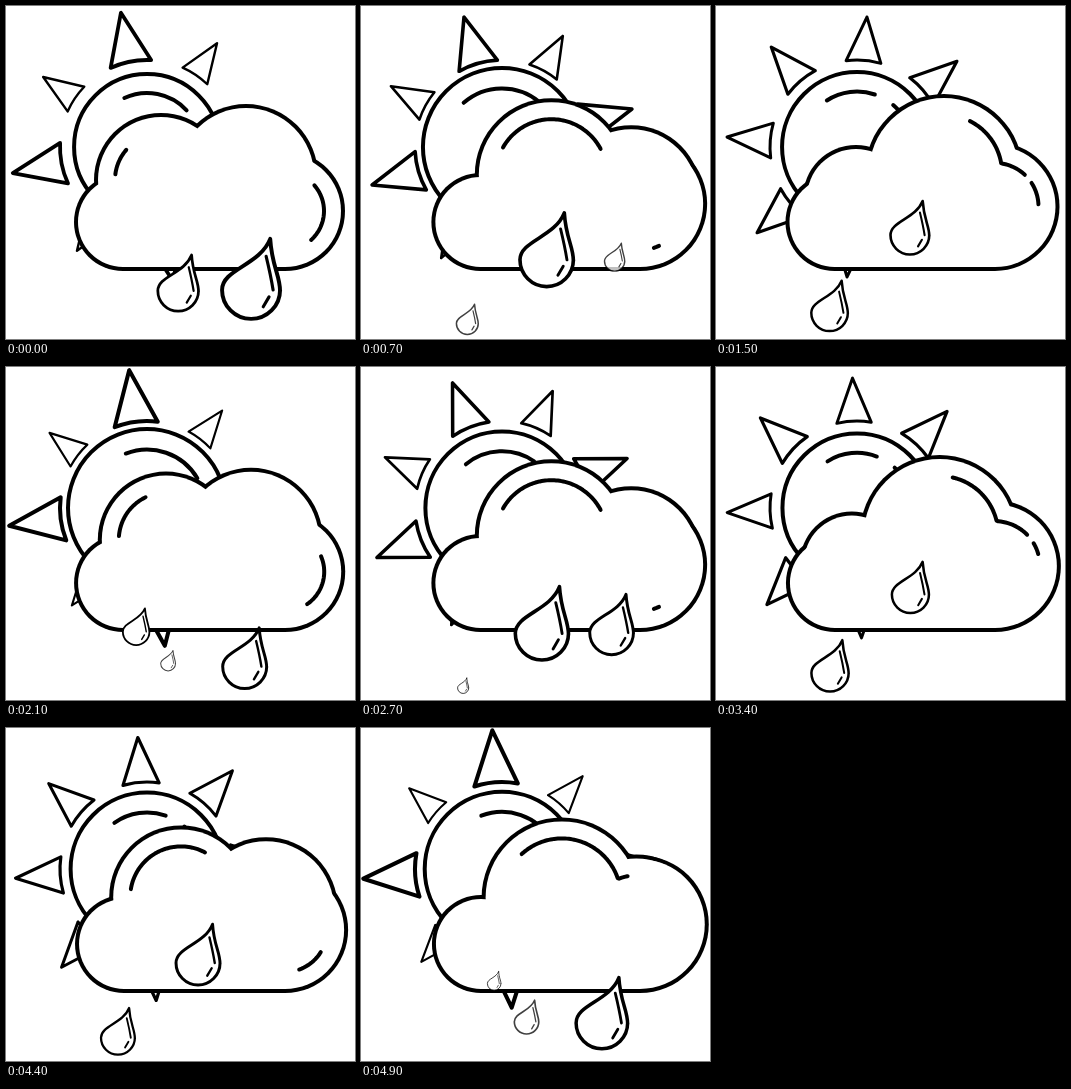
An HTML page with a canvas that plays this animation: 349 px wide and 333 px high, repeating every 5000 ms.

```html
<!DOCTYPE html>
<html lang="en">
<head>
<meta charset="utf-8">
<title>Sun, cloud and rain</title>
<style>
html, body { margin: 0; width: 100%; height: 100%; overflow: hidden; background: #fff; }
canvas { display: block; }
</style>
</head>
<body>
<canvas id="stage" width="349" height="333"></canvas>
<script>
const ctx = document.getElementById('stage').getContext('2d');
const LOOP = 5000, STEP = 100, ROLL = 2000, BEAT = 955;
const TURN = 2 * Math.PI, RAD = Math.PI / 180;
const SUN = { x: 141, y: 141 };
const PIVOT = { x: 205, y: 215 };
const GROUND = 263;
const INK = '#000', PAPER = '#fff';

// path of a cloud bump, one point per quarter roll: x, y, radius
const BUMP = [[119, 214, 45], [140, 192, 51], [155, 174, 65], [180, 168, 71], [206, 170, 80],
  [228, 167, 77], [240, 170, 70], [265, 184, 70], [278, 198, 66]];

const DROPS = [
  { born: .43, span: .87, x: 201, drift: -44, y: 206, fall: 92, size: 54 },
  { born: .69, span: .78, x: 255, drift: -25, y: 250, fall: 58, size: 58 },
  { born: 1.09, span: .83, x: 135, drift: -37, y: 250, fall: 72, size: 42 }
];

const polar = (r, deg) => [r * Math.cos(deg * RAD), r * Math.sin(deg * RAD)];

function pen(width) {
  ctx.lineWidth = width;
  ctx.lineCap = ctx.lineJoin = 'round';
  ctx.strokeStyle = INK;
  ctx.fillStyle = PAPER;
}

function arc(r, from, to) {
  ctx.beginPath();
  ctx.arc(0, 0, r, from * RAD, to * RAD);
  ctx.stroke();
}

function drawRay(angle, contrast) {
  const half = (35.5 + contrast * .5) / 2;
  const spread = Math.asin(half / 87) / RAD;
  ctx.beginPath();
  ctx.moveTo(...polar(131 + contrast / 2, angle));
  ctx.lineTo(...polar(87, angle - spread));
  ctx.arc(0, 0, 87, (angle - spread) * RAD, (angle + spread) * RAD);
  ctx.closePath();
  pen(3.1 + contrast * .06);
  ctx.stroke();
}

function drawSun(time) {
  // a steady turn that lags behind at first
  const lag = 15.5 * Math.sin(Math.PI * (time / 3400) ** .75);
  const spin = -101 - time * .09 + Math.max(-2, lag);
  const x = (time / BEAT + .92) % 1;
  const contrast = 3.5 + 12.5 * Math.cos(TURN * x ** 1.8);
  const radius = 75.9 + 3.2 * Math.cos(2 * TURN * (x - .64));
  const from = -124 + contrast * .8, to = -75 + Math.abs(contrast) * 2.8;
  ctx.save();
  ctx.translate(SUN.x, SUN.y);
  for (let i = 0; i < 8; i++) drawRay(spin + i * 45, i % 2 ? -contrast : contrast);
  pen(4);
  arc(radius, 0, 360);
  arc(radius * .74, from, to);
  arc(radius * .74, to + 22, to + 30);
  ctx.restore();
}

function bumpAt(u) {
  const pos = (u - .5) * 4, i = Math.floor(pos);
  if (i < 0 || i >= BUMP.length - 1) return null;
  const [x, y, r] = BUMP[i].map((v, j) => v + (BUMP[i + 1][j] - v) * (pos - i));
  return { x, y, r };
}

// two swaying end puffs with bumps rolling from the left one to the right one
function cloudCircles(phase) {
  const sway = Math.cos(TURN * phase);
  const r = 62.5 - 4.5 * sway;
  const left = { x: 118.5 - 1.5 * sway, y: GROUND - 47, r: 47 };
  const right = { x: 279, y: GROUND - r, r };
  const bumps = [phase, phase + 1, phase + 2].map(bumpAt).filter(Boolean);
  return [left, ...bumps, right];
}

function fillCloud(circles, grow, color) {
  const left = circles[0], right = circles[circles.length - 1];
  ctx.fillStyle = color;
  for (const c of circles) {
    ctx.beginPath();
    ctx.arc(c.x, c.y, c.r + grow, 0, TURN);
    ctx.fill();
  }
  ctx.fillRect(left.x, 205, right.x - left.x, GROUND - 205 + grow);
}

// farthest edge of the inset circles, seen from the pivot
function reach(circles, deg) {
  const [ux, uy] = polar(1, deg);
  let far = 0;
  for (const c of circles) {
    const x = c.x - PIVOT.x, y = c.y - PIVOT.y, r = c.r - 19;
    const along = x * ux + y * uy, off = x * uy - y * ux;
    if (Math.abs(off) < r) far = Math.max(far, along + Math.sqrt(r * r - off * off));
  }
  return [PIVOT.x + far * ux, PIVOT.y + far * uy];
}

function drawShine(circles, from, to) {
  if (to <= from) return;
  ctx.beginPath();
  for (let a = from; a < to; a++) ctx.lineTo(...reach(circles, a));
  ctx.lineTo(...reach(circles, to));
  ctx.stroke();
}

function drawCloud(time) {
  const phase = time / ROLL % 1;
  const circles = cloudCircles(phase);
  fillCloud(circles, 2, INK);
  fillCloud(circles, -2, PAPER);
  pen(4);
  for (const u of [phase - 1, phase, phase + 1]) {
    if (u < -.07 || u > 1.45) continue;
    const head = 17 - 157 * Math.max(0, 1 - u / 1.25) ** 2;
    const tail = 17 - 85.5 * (1 + Math.cos(Math.PI * u / 1.45));
    drawShine(circles, tail, Math.min(head, -24));
    drawShine(circles, Math.max(tail, -19), head);
  }
}

function drawDrop(cx, cy, w) {
  if (w < 3) return;
  const line = Math.max(1, w * .068) / w;
  ctx.save();
  ctx.translate(cx, cy);
  ctx.scale(w, w);
  pen(line);
  if (w < 26) ctx.globalAlpha = .75;
  ctx.beginPath();
  ctx.moveTo(.33, -.88);
  ctx.bezierCurveTo(.36, -.4, .5, -.25, .5, .02);
  ctx.arc(0, 0, .5, 0, Math.PI);
  ctx.bezierCurveTo(-.5, -.36, .15, -.42, .33, -.88);
  ctx.closePath();
  ctx.fill();
  ctx.stroke();
  pen(line * .8);
  ctx.beginPath();
  ctx.moveTo(.26, -.58);
  ctx.quadraticCurveTo(.34, -.25, .38, 0);
  ctx.moveTo(.31, .12);
  ctx.lineTo(.21, .29);
  ctx.stroke();
  ctx.restore();
}

function drawRain(time) {
  const beat = time / BEAT % 1;
  for (const d of DROPS)
    for (const u of [beat, beat + 1]) {
      const k = (u - d.born) / d.span;
      if (k <= 0 || k >= 1) continue;
      const w = d.size * Math.sin(Math.PI * k ** .75);
      drawDrop(d.x + d.drift * k, d.y + d.fall * Math.sin(Math.PI / 2 * k), w);
    }
}

function draw(now) {
  const time = Math.floor(now % LOOP / STEP) * STEP;
  ctx.fillStyle = PAPER;
  ctx.fillRect(0, 0, 349, 333);
  drawSun(time);
  drawCloud(time);
  drawRain(time);
}

const start = performance.now();
function tick() {
  draw(performance.now() - start);
  requestAnimationFrame(tick);
}
tick();
</script>
</body>
</html>
```
